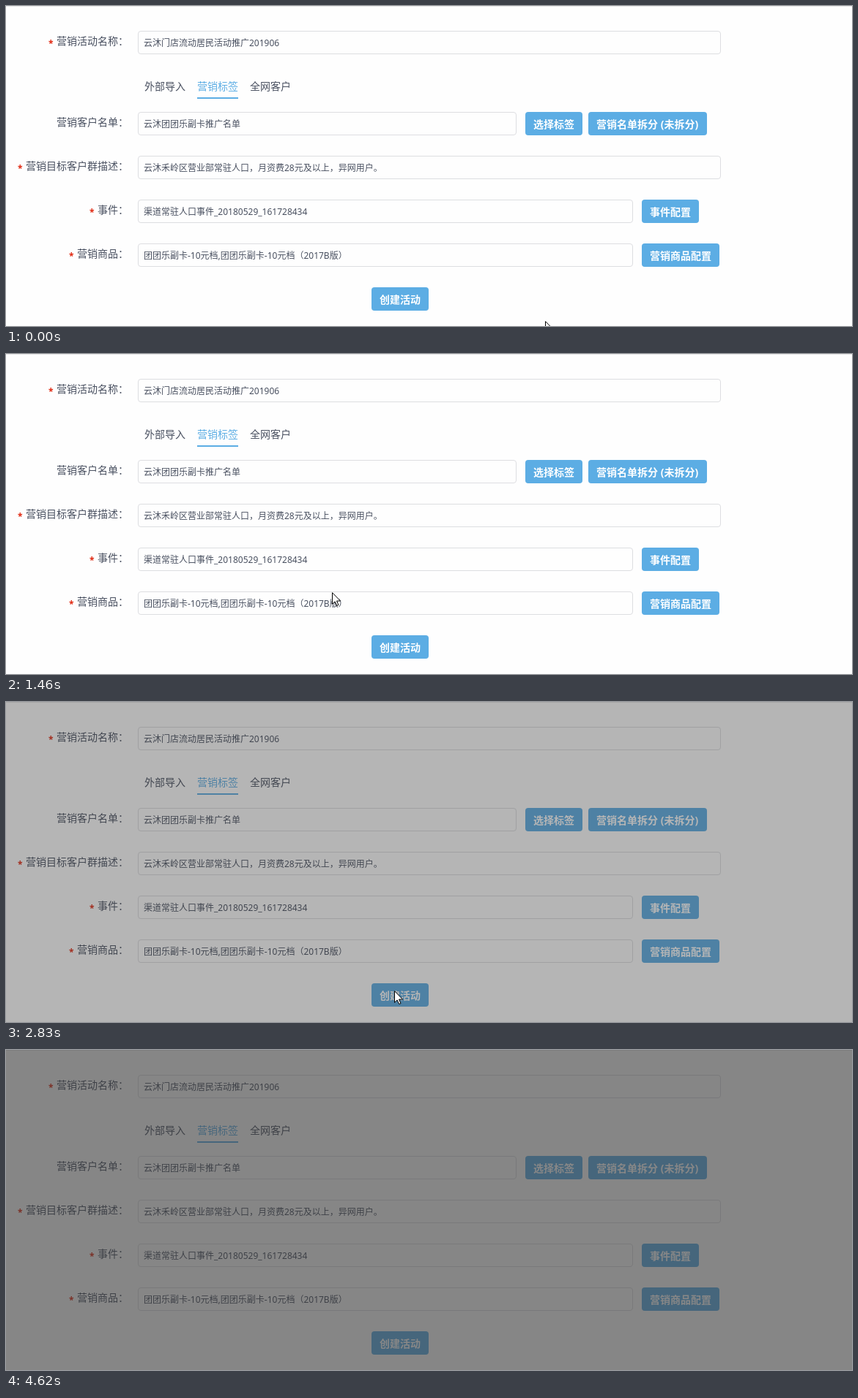
An HTML page for the animation above (5030 ms loop, 1155 px wide and 438 px high).

```html
<!DOCTYPE html>
<html lang="zh-CN">
<head>
<meta charset="utf-8">
<title>营销活动</title>
<style>
  html, body { margin: 0; width: 100%; height: 100%; overflow: hidden; background: #fefefe; }
  svg { display: block; width: 1155px; height: 438px; }
  text { font: 14px "Noto Sans", "Noto Sans CJK SC", "Noto Sans CJK", sans-serif; fill: #495060; white-space: pre; }
  .value { font-size: 12px; }
  .star { font-size: 12px; font-weight: 700; fill: #e0240c; }
  .on { fill: #5cade4; }
  .caption { fill: #fff; font-weight: 700; }
  .field { fill: #fefefe; stroke: #dddee1; }
  .field.hover { stroke: #7dbee9; }
  .button { fill: #5cade4; }
  .button.hover { fill: #7dbdea; }
  .button.press { fill: #58a4d9; }
  .cursor path { fill: #fff; stroke: #000; stroke-linejoin: round; }
  .cursor .line { fill: none; }
</style>
</head>
<body>
<svg id="stage" viewBox="0 0 1155 438">
  <rect width="1155" height="1" fill="#e8e8e8"/>
  <g id="form"></g>
  <rect id="mask" width="1155" height="438" fill="#373737" opacity="0"/>
  <g class="cursor" id="arrow">
    <path d="M.5 .7V16.3L4.1 12.9L6.7 18.5L9 17.5L6.5 12H11.5Z"/>
  </g>
  <g class="cursor" id="beam">
    <path class="line" d="M-3 -7.5H-1L.5 -6.5L2 -7.5H4M.5 -6.5V6.5M-3 7.5H-1L.5 6.5L2 7.5H4" stroke-width="1.4"/>
  </g>
  <g class="cursor" id="hand">
    <path d="M-1.5 14V2Q0 -.6 1.5 2V8Q3.5 6.8 4.5 8.5Q6.3 7.6 7.5 9.4Q9.5 9 9.5 11.5V15Q9.5 17.5 7.5 20V23H-.5V20.5Q-3 18 -6 13.2Q-6.5 10.4 -4 11.5Z"/>
    <path class="line" d="M1.5 8V12M4.5 9V12.5M7.5 10V13"/>
  </g>
</svg>
<script>
const LOOP = 5030;
const $ = id => document.getElementById(id);
const form = $('form');

function add(tag, attrs, content = '') {
  const node = document.createElementNS('http://www.w3.org/2000/svg', tag);
  for (const key in attrs) node.setAttribute(key, attrs[key]);
  node.textContent = content;
  return form.appendChild(node);
}

const text = (x, y, content, cls = '') => add('text', { x, y, class: cls }, content);

function label(x, y, content, required = true) {
  if (required) text(x - 11, y + 3, '*', 'star');
  text(x, y, content + '：');
}

function field(y, right, value) {
  const box = add('rect', { x: 180.5, y: y + .5, width: right - 181, height: 31, rx: 3.5, class: 'field' });
  text(188, y + 21, value, 'value');
  return box;
}

function button(x, y, width, caption) {
  const box = add('rect', { x, y, width, height: 32, rx: 4, class: 'button' });
  text(x + 11, y + 22, caption, 'caption');
  return box;
}

label(69, 53, '营销活动名称');
label(69, 164, '营销客户名单', false);
label(27, 224, '营销目标客户群描述');
label(125, 284, '事件');
label(97, 344, '营销商品');

text(189, 115, '外部导入');
text(261, 115, '营销标签', 'on');
text(333, 115, '全网客户');
add('rect', { x: 261, y: 125, width: 56, height: 2, class: 'on' });

field(205, 976, '云沐禾岭区营业部常驻人口，月资费28元及以上，异网用户。');
button(709, 145, 78, '选择标签');
button(795, 145, 162, '营销名单拆分 (未拆分)');
button(868, 265, 78, '事件配置');
button(868, 325, 106, '营销商品配置');

const targets = {
  name: field(34, 976, '云沐门店流动居民活动推广201906'),
  list: field(145, 697, '云沐团团乐副卡推广名单'),
  event: field(265, 856, '渠道常驻人口事件_20180529_161728434'),
  goods: field(325, 856, '团团乐副卡-10元档,团团乐副卡-10元档（2017B版）'),
  create: button(499, 385, 78, '创建活动')
};
const cursors = { arrow: $('arrow'), beam: $('beam'), hand: $('hand') };

// time, x, y, cursor, highlighted control, its state
const steps = [
  [0, 736, 431, 'arrow'],
  [140, 690, 365, 'arrow'],
  [260, 590, 245, 'arrow'],
  [380, 465, 161, 'beam', 'list'],
  [500, 360, 87, 'arrow', 'list'],
  [650, 296, 61, 'beam'],
  [800, 268, 50, 'beam', 'name'],
  [920, 272, 66, 'beam', 'name'],
  [1060, 305, 118, 'arrow'],
  [1190, 355, 215, 'beam'],
  [1310, 410, 302, 'arrow', 'event'],
  [1460, 445, 326, 'arrow'],
  [1600, 470, 355, 'arrow', 'goods'],
  [1730, 493, 383, 'arrow'],
  [1870, 520, 391, 'hand', 'create'],
  [2000, 532, 395, 'hand', 'create'],
  [2570, 532, 395, 'hand', 'create', 'press'],
  [2830, 530, 395, 'arrow'],
  [3530, 605, 393, 'arrow'],
  [3650, 689, 390, 'arrow'],
  [3800, 800, 328, 'arrow'],
  [3930, 898, 256, 'arrow'],
  [4070, 988, 252, 'arrow'],
  [4200, 1095, 361, 'arrow'],
  [4350, 1130, 400, 'arrow'],
  [4470, 1150, 426, 'arrow'],
  [4620, 1200, 470, 'arrow']
];
const fade = [[0, 0], [2710, .065], [2830, .367], [2950, .6]];

const at = (table, time) => table.findLast(row => row[0] <= time);

function draw() {
  const time = performance.now() % LOOP;
  const [, x, y, shape, target, state = 'hover'] = at(steps, time);
  for (const key in cursors) {
    cursors[key].style.display = key === shape ? '' : 'none';
    cursors[key].setAttribute('transform', `translate(${x} ${y})`);
  }
  for (const key in targets) {
    targets[key].classList.remove('hover', 'press');
    if (key === target) targets[key].classList.add(state);
  }
  $('mask').setAttribute('opacity', at(fade, time)[1]);
  requestAnimationFrame(draw);
}
draw();
</script>
</body>
</html>
```
